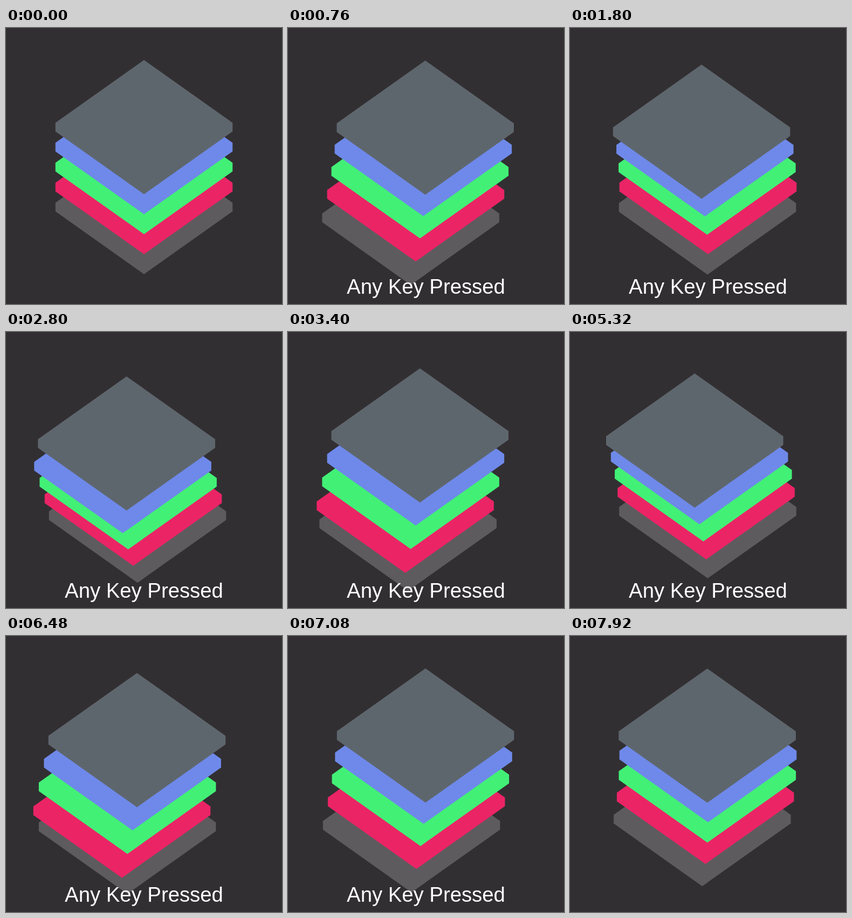
Animation of 512 by 511 pixels, one loop 8000 ms. Source, as an HTML page:

```html
<!DOCTYPE html>
<html lang="en">
<head>
<meta charset="utf-8">
<title>Layer wave</title>
<style>
  html, body { margin: 0; width: 100%; height: 100%; overflow: hidden; background: #322f32; }
  svg { display: block; width: 100%; height: 100%; }
  text { font: 38.3px "Liberation Sans", Arial, sans-serif; fill: #fff; text-anchor: middle; }
</style>
</head>
<body>
<svg id="stage" viewBox="0 0 512 511">
  <g id="stack"></g>
  <text id="label" x="256" y="491.5">Any Key Pressed</text>
</svg>
<script>
  const LOOP = 8000;
  const STEP = 40;
  const COLORS = ['#5e666d', '#6e89e9', '#42f076', '#eb2466', '#5e5b5e'];
  const HALF = 164.3, RISE = 116.2, THICK = 16, TOP = 59.3, GAP = 37;
  const REACH = 41, SLOPE = RISE / HALF, LAG = 0.25, SHIFT = 1.017;

  // Spans of time during which a key is held: [press, release]
  const HOLDS = [[40, 840], [1240, 1400], [1800, 2360], [2800, 4400], [4520, 5480], [5800, 7600]];

  const stack = document.getElementById('stack');
  const label = document.getElementById('label');

  function slab(color, i) {
    const el = document.createElementNS('http://www.w3.org/2000/svg', 'path');
    el.setAttribute('fill', color);
    el.setAttribute('d', `M256 ${TOP + i * GAP}l${HALF} ${RISE}v${THICK}l${-HALF} ${RISE}l${-HALF} ${-RISE}v${-THICK}z`);
    stack.prepend(el);
    return el;
  }
  const slabs = COLORS.map(slab);

  // Distance a slab has slid at the given phase: slow at rest, sharp turn at full reach
  const slide = phase => REACH * (1 - Math.abs(Math.cos(phase)));

  function draw(ms) {
    const t = Math.floor((ms % LOOP) / STEP) * STEP;
    const hold = HOLDS.filter(h => h[0] <= t).pop();
    const pressed = !!hold && t < hold[1];
    // After release the stack stays where the last live step left it
    const live = pressed ? t : hold && hold[1] - STEP;

    slabs.forEach((el, i) => {
      const d = hold ? slide(live / 1000 - SHIFT - i * LAG) : 0;
      el.setAttribute('transform', `translate(${-d} ${d * SLOPE})`);
    });
    label.setAttribute('visibility', pressed ? 'visible' : 'hidden');
  }

  const start = performance.now();
  function tick() {
    draw(performance.now() - start);
    requestAnimationFrame(tick);
  }
  tick();
</script>
</body>
</html>
```
